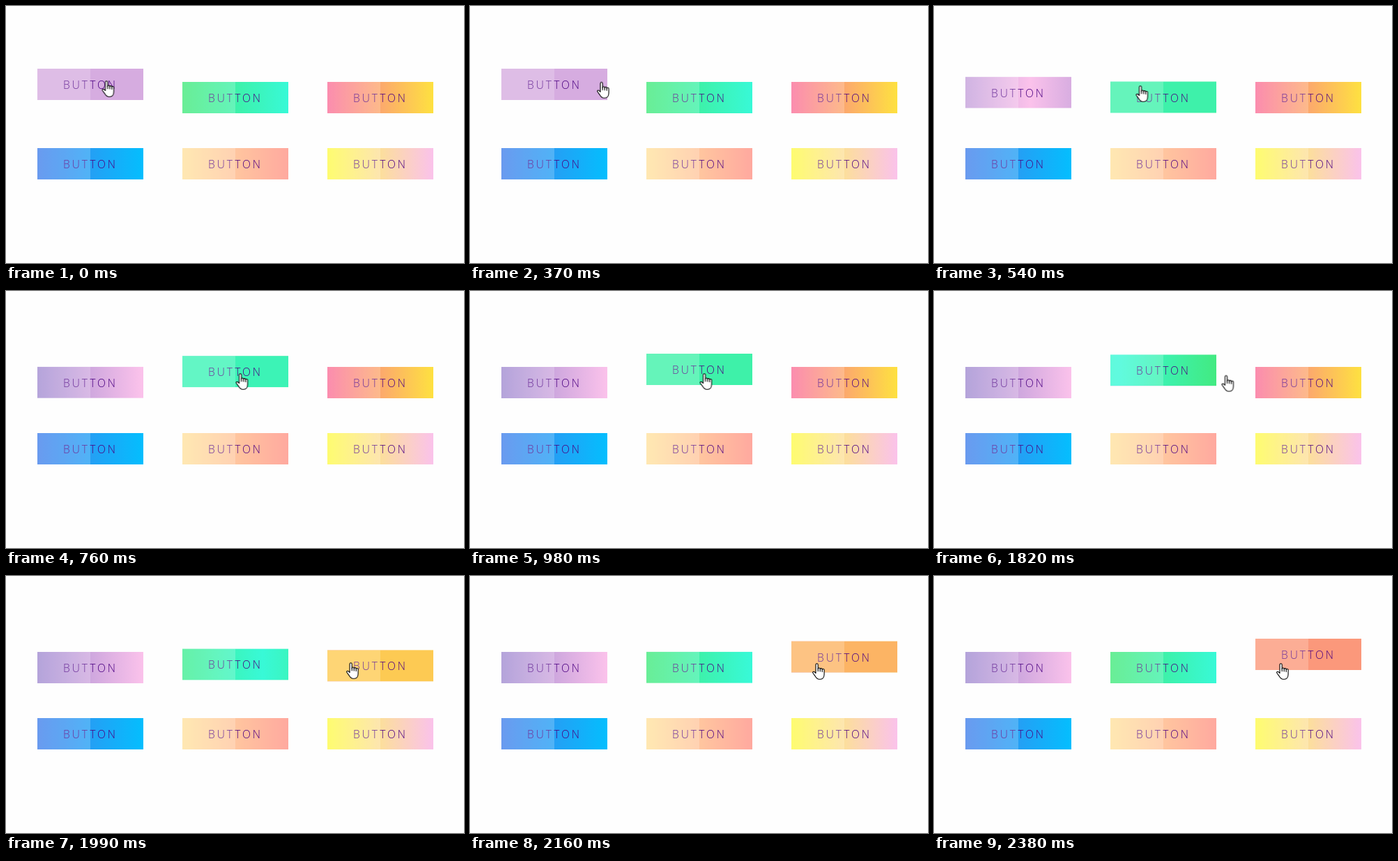
Animation of 657x369 px, one loop 3060 ms. Source, as an HTML page:

```html
<!DOCTYPE html>
<html lang="en">
<head>
<meta charset="utf-8">
<title>Gradient buttons</title>
<style>
  html, body { margin: 0; width: 100%; height: 100%; overflow: hidden; background: #fefefe; }
  .btn {
    position: absolute; width: 152px; height: 45px;
    display: flex; align-items: center; justify-content: center;
    background-size: 200% 100%;
    font: 300 15.5px "Open Sans", "Noto Sans", sans-serif;
    letter-spacing: 3px; color: #4b0082;
  }
  .btn span { position: relative; }
  .btn::after {
    content: ""; position: absolute; inset: 0 50% 0 0;
    background: rgba(255, 255, 255, .2);
  }
  .flat { position: absolute; inset: 0; }
  #hand { position: absolute; left: 0; top: 0; overflow: visible; }
</style>
</head>
<body>
<svg id="hand" width="18" height="24" fill="#fff" stroke="#000" stroke-width="1.1" stroke-linejoin="round" stroke-linecap="round">
  <path d="M5 14.5V2.4a1.6 1.6 0 0 1 3.2 0V8.4a1.5 1.5 0 0 1 3 .1V9a1.5 1.5 0 0 1 3 .2v.6a1.4 1.4 0 0 1 2.9.2V16c0 4-2 7.3-5.5 7.3H10c-3 0-4.5-2-6-4.7L.9 14.3c-.8-1.5 1-2.7 2.2-1.6z"/>
  <path fill="none" d="M8.2 8.4v3.4M11.2 9v3M14.2 9.8v2.6"/>
</svg>
<script>
const LOOP = 3060, LIFT = -19, FADE = 450;
const COLORS = [
  ['#a18cd1', '#fbc2eb'], ['#43e97b', '#38f9d7'], ['#fa709a', '#fee140'],
  ['#4481eb', '#04befe'], ['#ffe29f', '#ffa99f'], ['#fefb4c', '#fac2eb']
];

// Each step is [time, value, easing to the next step].
function play(el, prop, steps) {
  const all = [[0, steps[0][1]], ...steps, [LOOP, steps[steps.length - 1][1]]];
  el.animate(all.map(([t, value, easing = 'linear']) =>
    ({ offset: t / LOOP, [prop]: value, easing })), { duration: LOOP, iterations: Infinity });
}

const channels = hex => [1, 3, 5].map(i => parseInt(hex.slice(i, i + 2), 16));
function mix([a, b], k) {
  const end = channels(b);
  return `rgb(${channels(a).map((v, i) => Math.round(v + (end[i] - v) * k))})`;
}

const buttons = COLORS.map((pair, i) => {
  const el = document.createElement('div');
  el.className = 'btn';
  el.style.left = 45 + 208 * (i % 3) + 'px';
  el.style.top = (i < 3 ? 109 : 204) + 'px';
  el.style.backgroundImage = `linear-gradient(to right, ${pair[0]}, ${pair[1]}, ${pair[0]})`;
  el.innerHTML = '<i class="flat"></i><span>BUTTON</span>';
  document.body.insertBefore(el, document.getElementById('hand'));
  return { el, flat: el.firstChild, pair };
});

const lift = (i, steps) => play(buttons[i].el, 'transform',
  steps.map(([t, k, e]) => [t, `translateY(${k * LIFT}px)`, e]));
const slide = (i, steps) => play(buttons[i].el, 'backgroundPosition',
  steps.map(([t, k, e]) => [t, `${k * 100}% 0`, e]));
const tint = (i, steps) => play(buttons[i].flat, 'backgroundColor',
  steps.map(([t, k]) => [t, k === null ? 'transparent' : mix(buttons[i].pair, k)]));

const LEAVE1 = 382, ENTER2 = 522, LEAVE2 = 1785, ENTER3 = 1935, STOP = 2380;

lift(0, [[LEAVE1, 1, 'ease'], [LEAVE1 + FADE, 0]]);
slide(0, [[LEAVE1, 1, 'ease'], [LEAVE1 + FADE, 0]]);
tint(0, [[0, .59], [LEAVE1, .59], [LEAVE1, null]]);

lift(1, [[ENTER2, 0, 'ease'], [ENTER2 + FADE, 1], [LEAVE2, 1, 'ease'], [LEAVE2 + FADE, 0]]);
slide(1, [[ENTER2, 0], [ENTER2, 1], [LEAVE2, 1, 'ease'], [LEAVE2 + FADE, 0]]);
tint(1, [[ENTER2, null], [ENTER2, .5], [760, .64], [980, .5], [LEAVE2, .5], [LEAVE2, null]]);

lift(2, [[ENTER3, 0, 'ease'], [STOP, 1]]);
tint(2, [[ENTER3, null], [ENTER3, .86], [STOP, .35]]);

play(document.getElementById('hand'), 'transform', [
  [310, 137.5, 107], [LEAVE1, 190, 109], [ENTER2, 252, 113], [540, 289, 114],
  [620, 322, 117], [700, 329.5, 118], [1290, 329.5, 118], [1290, 330.5, 117.5],
  [1600, 330.5, 117.5], [1600, 334.5, 117.5], [LEAVE2, 398, 120], [ENTER3, 458, 123],
  [1990, 488, 124], [2090, 491, 125]
].map(([t, x, y]) => [t, `translate(${x}px, ${y}px)`]));
</script>
</body>
</html>
```
